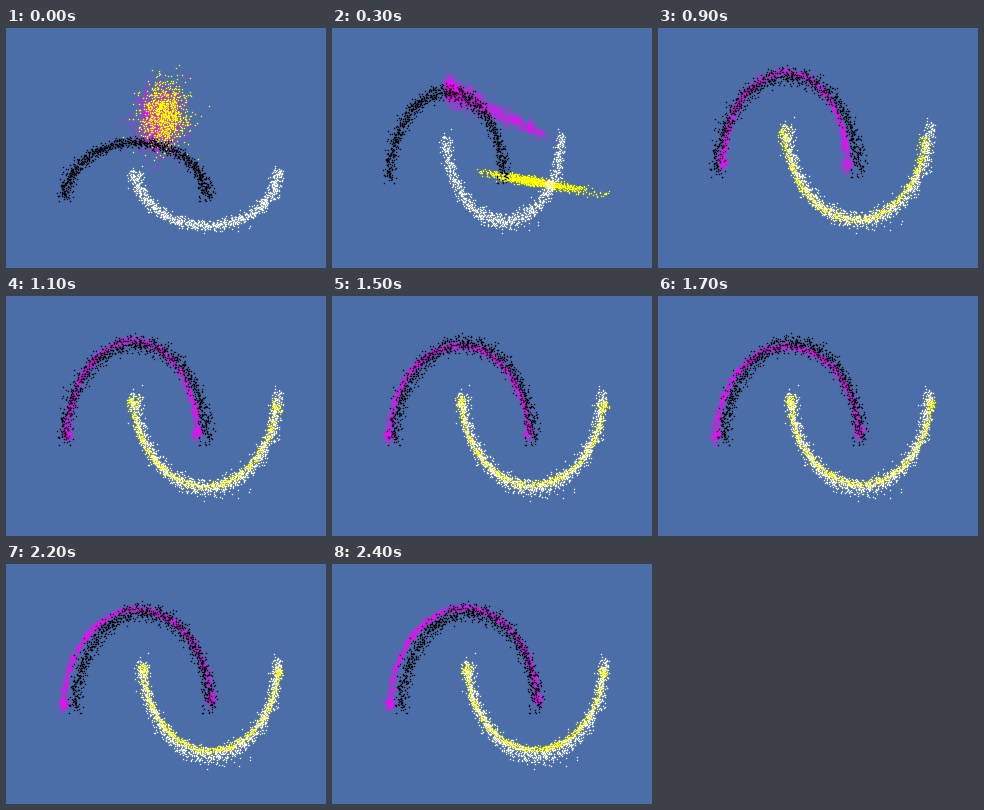
Recreate the animation shown at these times as a matplotlib script. Size 320 by 240 pixels, loop 2500 ms.

```python
import numpy as np
import matplotlib.pyplot as plt
from matplotlib.animation import FuncAnimation

W, H, FRAMES, STEP = 320, 240, 25, 100
N = 1000
SPREAD, JOIN, END = 300, 600, 2400  # blob -> streak -> arc -> last pose, in ms

rng = np.random.default_rng(4)


def moon(angle, r, lower):
    x, y = -r * np.cos(angle), r * np.sin(angle)
    return np.array([1 + x, .5 - y] if lower else [x, y])


REAL = [moon(np.linspace(0, np.pi, N), 1, k) + rng.normal(0, .05, (2, N))
        for k in (False, True)]
U = rng.uniform(-.06, 1.06, N).clip(0, 1)


def smooth(x):
    x = min(max(x, 0), 1)
    return x * x * (3 - 2 * x)


def blob(z, lower):
    x, y = (.41, 1.5) if lower else (.34, 1.42)
    return np.array([x + .165 * z[0], y + .28 * z[1]])


def streak(z, lower):
    if lower:
        x = 1.5 + .44 * z[0] + .03 * z[0] ** 2
        return np.array([x, .14 - .114 * x + .028 * z[1]])
    s = U ** 2
    x = -.04 + 1.45 * s + abs(z[0]) * (.12 + .06 * s)
    return np.array([x, 1.06 - .324 * x + (.08 - .045 * s) * z[1]])


def radii(p, lower):
    """Radius at the left end, the middle and the right end of an arc."""
    if lower:
        dip = np.exp(-((p - .78) / .1) ** 2)
        return 1.04 - .13 * dip, 1 - .065 * p, .9 + .14 * np.sin(2.4 * p)
    e = smooth(1.2 * p)
    return .9 + .27 * e, 1.01 + .035 * np.cos(2 * np.pi * p ** 1.5), .82 + .2 * e


def arc(z, t, lower):
    p = max(t - JOIN, 0) / (END - JOIN)
    rough = np.exp(-6 * p)
    a, b = (5, 174 - 14 * rough) if lower else (2 + 12 * rough, 175)
    angle = np.radians(a + (b - a) * U)
    left, mid, right = radii(p, lower)
    c = np.cos(angle)
    r = mid + (left - right) / 2 * c + ((left + right) / 2 - mid) * c ** 2
    width = (.02 + .014 * rough) * (1 + .8 * abs(2 * U - 1) ** 8)
    return moon(angle, r, lower) + width * z


def fake(t, lower):
    z = np.random.default_rng(2 * t + lower).normal(size=(2, N))
    if t >= JOIN:
        return arc(z, t, lower)
    if t <= SPREAD:
        k, start, stop = t / SPREAD, blob(z, lower), streak(z, lower)
    else:
        k = (t - SPREAD) / (JOIN - SPREAD)
        start, stop = streak(z, lower), arc(z, t, lower)
    return start + (stop - start) * k


# The view rescales to fit all points in every frame
fig, ax = plt.subplots(figsize=(W / 100, H / 100), dpi=100, facecolor="#4B6EA9")
ax.axis("off")


def dots(color):
    return ax.plot([], [], "s", color=color, ms=.95, mew=0, clip_on=False)[0]


fakes = [dots("#ff00ff"), dots("#ffff00")]
reals = [dots("black"), dots("white")]


def draw(i):
    for k in range(2):
        fakes[k].set_data(*fake(i * STEP, k))
        reals[k].set_data(*REAL[k])
    ax.relim()
    ax.autoscale_view()
    return fakes + reals


anim = FuncAnimation(fig, draw, frames=FRAMES, interval=STEP, repeat=True,
                     repeat_delay=0, blit=False)
plt.show()
```
